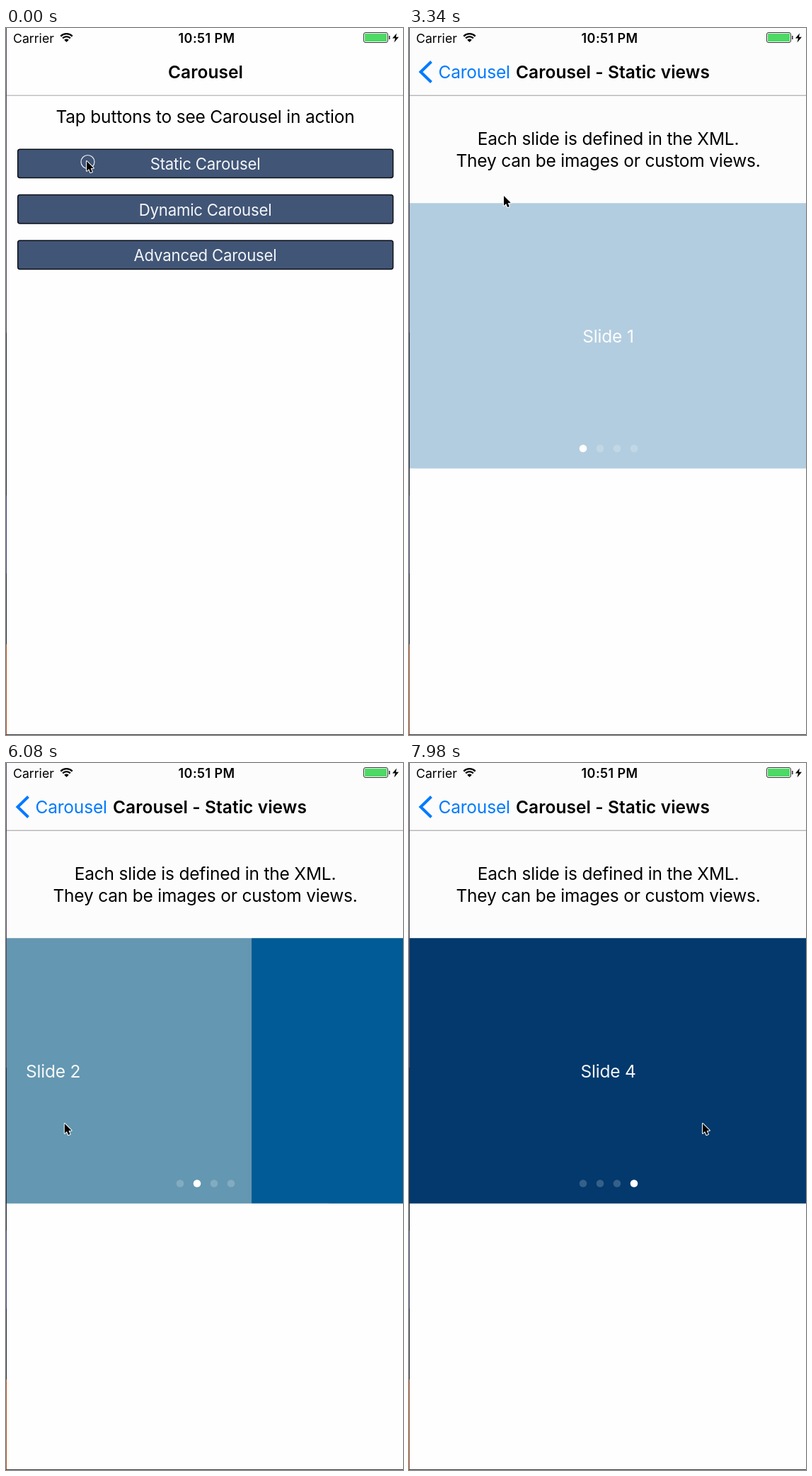
An HTML page with a canvas for the animation above (8000 ms loop, 561 by 998 pixels).

```html
<!DOCTYPE html>
<html lang="en">
<head>
<meta charset="utf-8">
<title>Carousel</title>
<style>
  html, body { margin: 0; width: 100%; height: 100%; overflow: hidden; background: #fefefe; }
  canvas { display: block; }
</style>
</head>
<body>
<canvas id="stage" width="561" height="998"></canvas>
<script>
const ctx = document.getElementById('stage').getContext('2d');
const W = 561, H = 998, LOOP = 8000;
const MID = 281.5, NAV = 95, BLUE = '#007aff';
const SLIDES = ['#b3cde0', '#6497b1', '#005b96', '#03396c'];

// The screen refreshes in ticks once the tap has been handled.
const TAP = 2864, TICK = 118.8;
const SWIPES = [10.6, 24.05, 33.22], SWIPE_TICKS = 7;

const clamp = v => Math.min(1, Math.max(0, v));
const mix = (a, b, u) => a + (b - a) * u;
const smooth = u => u * u * (3 - 2 * u);

const pushed = n => n < 0 ? 0 : n < 4 ? 1 - 0.873 * Math.pow(0.3, n) : 1;
const swiped = n => SWIPES.map(start => (n - start) / SWIPE_TICKS);

function pointerAt(n) {
  const approach = [[0, 114, 188], [4, 134, 237], [6, 274, 474], [9, 439, 509]];
  for (let i = 1; i < approach.length; i++) {
    const [t0, x0, y0] = approach[i - 1], [t1, x1, y1] = approach[i];
    const u = clamp((n - t0) / (t1 - t0));
    if (u < 1) return [mix(x0, x1, u), mix(y0, y1, u)];
  }
  // Each swipe pulls left and swings back to rest.
  const home = mix(439, 415, clamp((n - 36) / 4));
  const pull = swiped(n).reduce((sum, u) => sum + Math.pow(Math.sin(Math.PI * clamp(u / 1.2)), 1.7), 0);
  return [home - 432 * pull, 509];
}

function rect(x, y, w, h, color) {
  ctx.fillStyle = color;
  ctx.fillRect(x, y, w, h);
}

function text(str, x, y, { size = 24.5, weight = 400, color = '#000', align = 'center', alpha = 1, track = -0.2 } = {}) {
  ctx.save();
  ctx.globalAlpha = alpha;
  ctx.font = `${weight} ${size}px Inter, "Liberation Sans", sans-serif`;
  ctx.letterSpacing = track + 'px';
  ctx.textAlign = align;
  ctx.fillStyle = color;
  ctx.fillText(str, x, y);
  ctx.restore();
}

function path(points, close) {
  ctx.beginPath();
  points.forEach(([x, y]) => ctx.lineTo(x, y));
  if (close) ctx.closePath();
}

function circle(x, y, r) {
  ctx.beginPath();
  ctx.arc(x, y, r, 0, Math.PI * 2);
}

function stroke(color, width) {
  ctx.strokeStyle = color;
  ctx.lineWidth = width;
  ctx.stroke();
}

function fill(color) {
  ctx.fillStyle = color;
  ctx.fill();
}

function statusBar() {
  text('Carrier', 10, 20.5, { size: 17.7, align: 'left', track: 0 });
  text('10:51 PM', 283.5, 20.5, { size: 18, weight: 600, track: 0.4 });

  const a = -Math.PI * 0.75, b = -Math.PI * 0.25;
  for (const r of [11.6, 7.6]) {
    ctx.beginPath();
    ctx.arc(85.5, 19.8, r, a, b);
    stroke('#000', 2.3);
  }
  ctx.beginPath();
  ctx.moveTo(85.5, 20);
  ctx.arc(85.5, 20, 4.6, a, b);
  fill('#000');

  ctx.beginPath();
  ctx.roundRect(505.5, 6.5, 34, 14, 2.5);
  stroke('#333', 1);
  rect(507, 8, 31, 11, '#4cd964');
  rect(541, 11, 1.6, 5, '#333');
  path([[552, 7.5], [546, 14.5], [550, 14.5], [548.5, 20.5], [555, 12.8], [551, 12.8]], true);
  fill('#000');
}

function navBar(p, bg) {
  rect(0, 0, W, NAV, bg);
  rect(0, 94.6, W, 1.2, '#b2b2b4');
  statusBar();
  const title = { weight: 600, track: 0.06 }, fade = Math.pow(p, 1.2);
  text('Carousel', 282 - 135 * p, 70.5, { ...title, alpha: clamp(1 - 2.3 * p) });
  if (!p) return;
  text('Carousel - Static views', mix(580, 151, p), 70.5, { ...title, align: 'left', alpha: fade });
  text('Carousel', mix(228, 41.5, p), 70.5, { color: BLUE, align: 'left', alpha: p * p });
  ctx.globalAlpha = fade;
  path([[31.5, 47.5], [16.5, 62], [31.5, 76.5]]);
  stroke(BLUE, 4);
  ctx.globalAlpha = 1;
}

function menu(x, pressed, bg) {
  rect(0, NAV, W, H - NAV, bg);
  text('Tap buttons to see Carousel in action', MID + x, 134);
  ['Static', 'Dynamic', 'Advanced'].forEach((name, i) => {
    const y = 171.2 + i * 64.4;
    ctx.beginPath();
    ctx.roundRect(16.7 + x, y, 530.2, 40.4, 3);
    fill('#415576');
    stroke('#0b0f16', 1.5);
    text(name + ' Carousel', MID + x, y + 29, {
      size: 22.2, color: '#f4f6f9', alpha: pressed && i === 0 ? 0.2 : 1
    });
  });
}

function carousel(x, n, head, body) {
  const top = 247.2, h = 374.4, swipes = swiped(n);
  const off = W * swipes.reduce((sum, u) => sum + smooth(clamp(u)), 0);
  rect(x, NAV + 0.8, W, top - NAV, head);
  rect(x, top + h, W, H - top - h, body);
  text('Each slide is defined in the XML.', x + 280.5, 164.5);
  text('They can be images or custom views.', x + 280.5, 196);

  SLIDES.forEach((color, i) => {
    const left = x + i * W - off;
    rect(left, top, W, h, color);
    text('Slide ' + (i + 1), left + 280.5, 444, { color: '#fff', alpha: 0.95 });
  });

  const page = swipes.filter(u => u > 0.9).length;
  SLIDES.forEach((_, i) => {
    circle(x + 245 + i * 24, 593.5, 5.3);
    fill(i === page ? '#fff' : 'rgba(255,255,255,.2)');
  });
}

function pageShadow(x) {
  const g = ctx.createLinearGradient(x - 13, 0, x, 0);
  g.addColorStop(0, 'rgba(0,0,0,0)');
  g.addColorStop(1, 'rgba(0,0,0,.16)');
  rect(x - 13, NAV + 1, 13, H - NAV, g);
}

function pointer(n) {
  if (n <= 0) {
    circle(115.5, 189, 9.5);
    stroke('rgba(255,255,255,.9)', 1.2);
  }
  ctx.save();
  ctx.translate(...pointerAt(n));
  path([[0, 0], [0, 13.8], [3.2, 11], [5.3, 16], [7.8, 15], [5.7, 10.1], [9.8, 9.8]], true);
  ctx.lineJoin = 'round';
  stroke('#fff', 2);
  fill('#000');
  ctx.restore();
}

// A sliver of desktop shows at the left and bottom edges.
function desktopEdge() {
  rect(0, 0, 1, 430, '#574a62');
  rect(0, 430, 1, 440, '#232a3c');
  rect(0, 660, 1, 110, '#38496f');
  rect(0, 870, 1, 128, '#b9521c');
  rect(0, H - 1, W, 1, '#3a3a3e');
}

function draw(t) {
  const n = Math.max(-1, Math.floor((t - TAP) / TICK));
  const p = pushed(n), moving = p > 0 && p < 1;
  const bg = moving ? '#fbfbfb' : '#fefefe';
  const head = p < 1 ? bg : '#fcfcfc';

  if (p < 1) menu(-0.3 * W * p, p > 0, bg);
  if (p > 0) {
    const x = Math.round(1 + W * (1 - p));
    if (moving) pageShadow(x);
    carousel(x, n, head, bg);
  }
  navBar(p, head);
  pointer(n);
  desktopEdge();
}

function loop() {
  draw(performance.now() % LOOP);
  requestAnimationFrame(loop);
}
loop();
</script>
</body>
</html>
```
